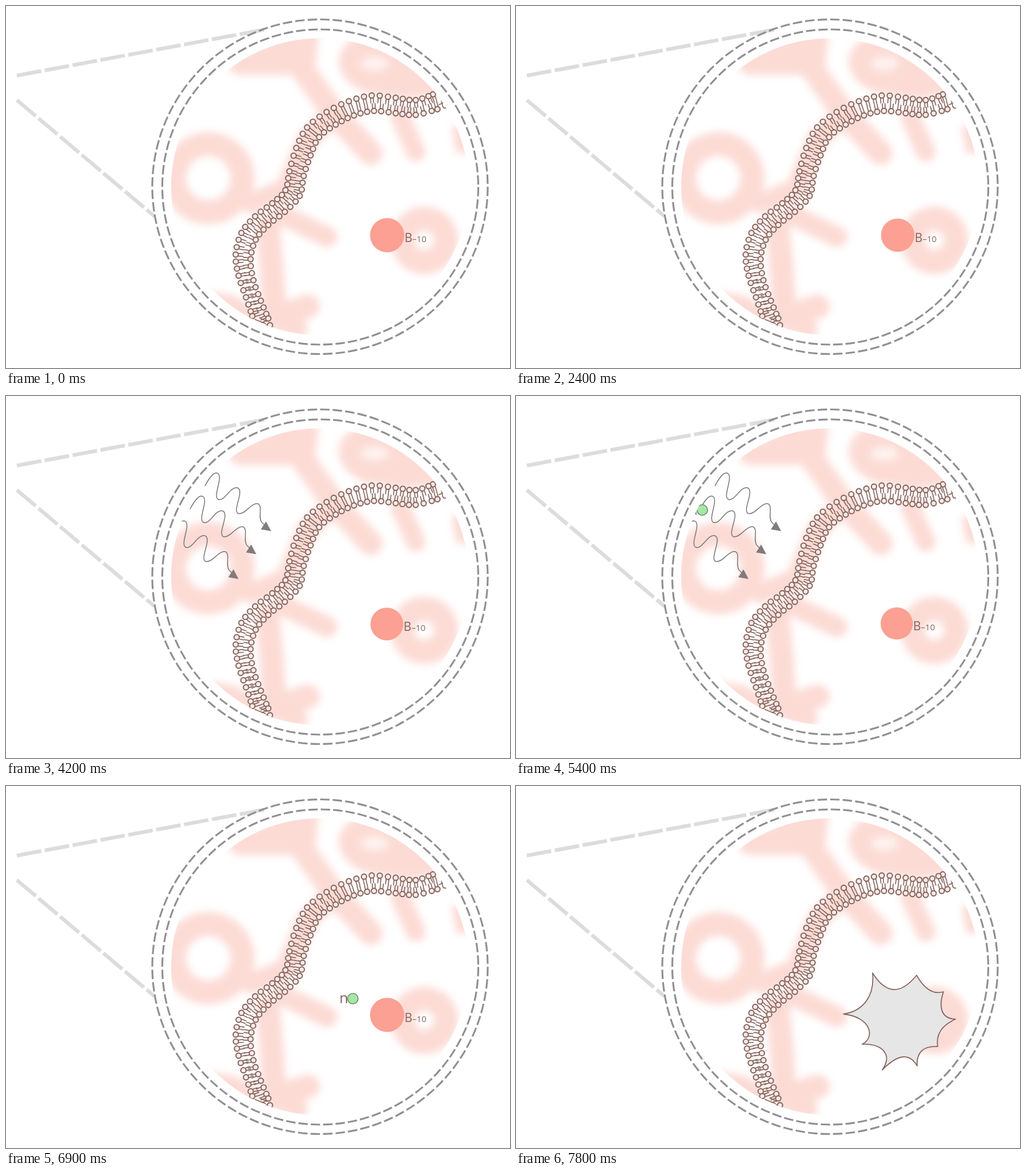
An HTML page that plays this animation: 882x635 px, repeating every 8 s.

```html
<!DOCTYPE html>
<html lang="en">
<head>
<meta charset="utf-8">
<title>Cell membrane</title>
<style>
html, body { margin: 0; width: 100%; height: 100%; overflow: hidden; background: #fff; }
svg { display: block; width: 100vw; height: 100vh; }
text { font-family: "Open Sans", sans-serif; fill: #86635e; }
.line { fill: none; stroke: #88665f; stroke-linecap: round; }
</style>
</head>
<body>
<svg viewBox="0 0 882 635">
  <defs>
    <clipPath id="lens"><circle cx="549.5" cy="317" r="260.5"/></clipPath>
    <filter id="soft" filterUnits="userSpaceOnUse" x="240" y="0" width="620" height="635" color-interpolation-filters="sRGB">
      <feGaussianBlur stdDeviation="7"/>
    </filter>
    <g id="ray">
      <path d="M348 158C357 141 365 132 371 136C380 143 362 175 371 181C382 187 392 158 405 161C418 166 396 200 406 206C417 210 430 186 441 189C450 193 440 214 448 222L456 230" fill="none" stroke="#777" stroke-width="1.5"/>
      <path d="M464 237L455 220L446 234Z" fill="#827b7b"/>
    </g>
  </defs>

  <g fill="none" stroke="#dcdcdc" stroke-width="6.5" stroke-dasharray="43.4 6.2">
    <path d="M19 122L452 41.5"/>
    <path d="M19 165L260 369"/>
  </g>

  <g fill="none" stroke="#909090" stroke-width="3.2">
    <circle cx="549.5" cy="317" r="293.5" stroke-dasharray="16.5 5.45"/>
    <circle cx="550" cy="317.5" r="276.5" stroke-dasharray="16.5 5.22"/>
  </g>

  <g clip-path="url(#lens)">
    <g filter="url(#soft)">
      <g fill="none" stroke="#fcdbd5" stroke-width="42" stroke-linecap="round" stroke-linejoin="round">
        <path d="M410 100H508"/>
        <path d="M517 70L517 108L575 190L638 258"/>
        <path d="M690 195L717 256" stroke-width="34"/>
        <circle cx="354" cy="302" r="60"/>
        <path d="M430 346L490 320L526 236L572 192" stroke-width="36"/>
        <path d="M486 368L562 405" stroke-width="36"/>
        <path d="M458 388L465 460L470 545L528 527"/>
        <path d="M470 550L510 566" stroke-width="36"/>
        <circle cx="732" cy="411" r="38"/>
      </g>
      <g fill="#fcdbd5">
        <path d="M420 84L480 48H547L542 104L450 108Z"/>
        <path d="M582 100Q582 66 622 52L700 60L790 150L700 163L630 152Q586 134 582 100Z"/>
        <path d="M780 212L820 200V258H788Z"/>
        <path d="M350 500L400 508L440 530L436 580L380 570Z"/>
      </g>
      <ellipse cx="645" cy="101" rx="24" ry="12" fill="#fef3f0"/>
    </g>

    <g id="membrane" class="line" stroke-width="1.7">
      <path d="M762 166L764 175Q765 180 770 179M758 173L767 169M436 550L454 557M444 547L456 553"/>
    </g>

    <g id="rays">
      <use href="#ray"/>
      <use href="#ray" x="-26" y="40.5"/>
      <use href="#ray" x="-57" y="84"/>
    </g>

    <g id="boron">
      <circle id="core" fill="#fba093"/>
      <text id="tag" font-size="21">B<tspan font-size="15">–10</tspan></text>
    </g>

    <g id="neutron">
      <circle r="9.2" fill="#a4e8a4" stroke="#708570" stroke-width="1.6"/>
      <text x="-23.5" y="7.5" font-size="25">n</text>
    </g>

    <path id="burst" class="line" style="fill:#e6e6e6" stroke-width="1.8" stroke-linejoin="round"
      d="M624 328Q659 384 701 332Q722 369 748 361C740 385 742 408 769 409Q733 425 738 457Q700 455 702 491Q682 456 641 498C660 470 640 452 606 453C630 440 620 405 573 400C608 395 628 368 624 328Z"/>
  </g>
</svg>
<script>
const LOOP = 8000, STEP = 300;
const $ = id => document.getElementById(id);
const lerp = (a, b, k) => a + (b - a) * k;
const clamp = k => Math.max(0, Math.min(1, k));

// Every third lipid head; the two between lie on the spline.
const outer = [[747,155],[717,165],[682,161],[640,157],[600,167],[561,186],[527,213],[508,249],[496,290],
  [489,323],[466,346],[436,369],[412,398],[402,436],[407,473],[420,511],[431,544]];
const inner = [[755,181],[717,191],[682,188],[644,184],[609,192],[577,208],[548,230],[533,262],[521,298],
  [514,333],[488,361],[459,384],[437,410],[428,444],[433,481],[446,517],[459,548]];

function spline(a, b, c, d, u) {
  return .5 * (2 * b + (c - a) * u + (2 * a - 5 * b + 4 * c - d) * u * u + (3 * b - a - 3 * c + d) * u ** 3);
}

function pointAt(pts, s) {
  const n = pts.length - 1, i = Math.min(n - 1, Math.max(0, Math.floor(s)));
  const p = [i - 1, i, i + 1, i + 2].map(j => pts[Math.max(0, Math.min(n, j))]);
  return [0, 1].map(k => spline(p[0][k], p[1][k], p[2][k], p[3][k], s - i));
}

function lipid(x, y, tx, ty, side) {
  const nx = ty * side, ny = -tx * side;
  const tail = w => {
    const sx = x + tx * w + nx * 4.4, sy = y + ty * w + ny * 4.4;
    return `M${sx} ${sy}L${sx + nx * 8.5} ${sy + ny * 8.5}`;
  };
  return `<path d="${tail(-2.4)}${tail(2.4)}"/>` +
    `<circle cx="${x}" cy="${y}" r="4.6" fill="#f9ebe8" stroke-width="2.1"/>`;
}

function lipids(pts, side) {
  let out = '';
  const count = (pts.length - 1) * 3;
  for (let i = 0; i <= count; i++) {
    const s = i / 3, [x, y] = pointAt(pts, s);
    const a = pointAt(pts, Math.max(0, s - .1)), b = pointAt(pts, Math.min(count / 3, s + .1));
    const dx = b[0] - a[0], dy = b[1] - a[1], len = Math.hypot(dx, dy);
    out += lipid(x, y, dx / len, dy / len, side);
  }
  return out;
}

$('membrane').insertAdjacentHTML('beforeend',
  lipids(outer, 1) + lipids(inner, -1) + lipid(462, 560, .3, .95, -1));

// time, x, y, radius
const drift = [[0,667,402,30],[600,667,402,30],[2400,668,402,29.3],[3300,666.5,401,29.2],
  [4200,666.5,400,28.8],[5400,666.3,399,28.2],[6900,667,401.5,30],[LOOP,667,401.5,30]];

function boronAt(t) {
  const i = drift.findIndex((key, j) => j && t <= key[0]);
  const a = drift[i - 1], b = drift[i], k = (t - a[0]) / (b[0] - a[0]);
  return [1, 2, 3].map(j => lerp(a[j], b[j], k));
}

function show(id, on) {
  $(id).style.display = on ? '' : 'none';
}

function draw(time) {
  const t = Math.floor((time % LOOP) / STEP) * STEP;

  const [x, y, r] = boronAt(t);
  show('boron', t < 7500);
  $('core').setAttribute('cx', x);
  $('core').setAttribute('cy', y);
  $('core').setAttribute('r', r);
  $('tag').setAttribute('x', x + r + .5);
  $('tag').setAttribute('y', y + 12.2);

  show('rays', t >= 2700 && t < 6600);
  const slide = -60 * Math.exp(-(t - 2700) / 163);
  $('rays').setAttribute('transform', `translate(${slide} 0)`);
  $('rays').setAttribute('opacity', 1 - clamp((t - 5700) / 900));

  show('neutron', t >= 5400 && t < 7500);
  const k = (t - 5400) / 1500;
  $('neutron').setAttribute('transform', `translate(${lerp(326, 607, k)} ${lerp(200, 373, k)})`);

  show('burst', t >= 7500);
  const size = t < 7800 ? .7 : 1;
  $('burst').setAttribute('transform', `translate(668 410) scale(${size}) translate(-668 -410)`);
}

const start = performance.now();
function tick() {
  draw(performance.now() - start);
  requestAnimationFrame(tick);
}
tick();
</script>
</body>
</html>
```
